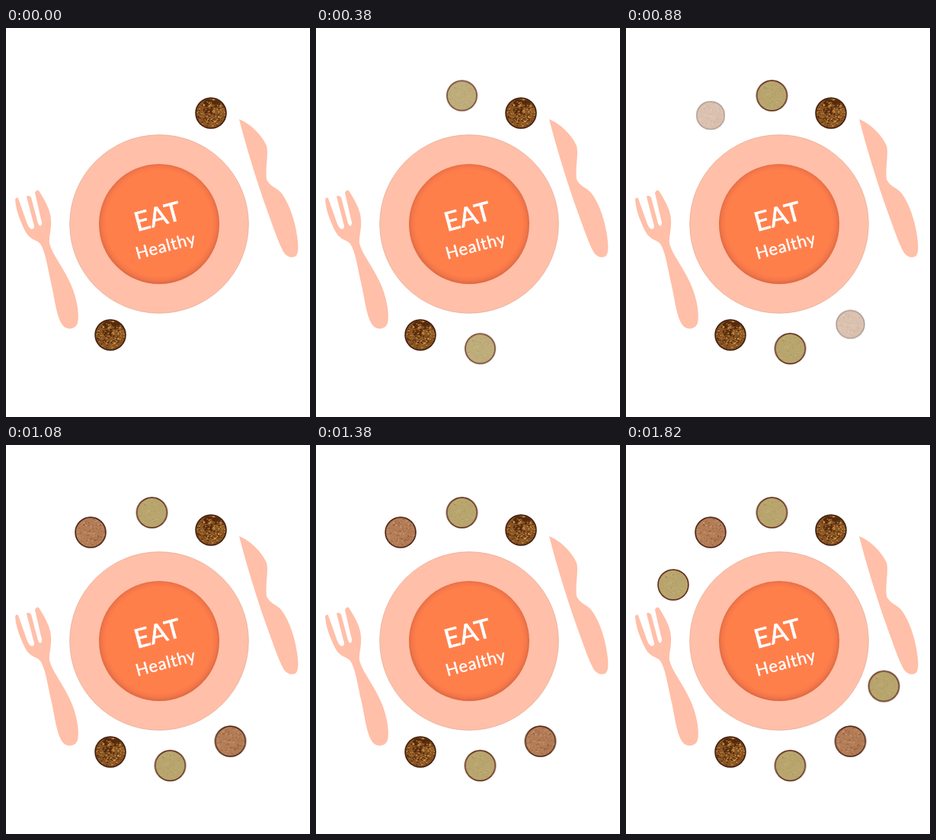
An HTML page that plays this animation: 399 by 512 pixels, repeating every 2700 ms.

```html
<!DOCTYPE html>
<html lang="en">
<head>
<meta charset="utf-8">
<title>Eat Healthy</title>
<style>
  html, body { margin: 0; width: 100%; height: 100%; overflow: hidden; background: #fff; }
  svg { display: block; width: 100vw; height: 100vh; }
  text {
    font-family: Lato, "Open Sans", sans-serif;
    fill: #fff; stroke: #fff; stroke-width: .7; stroke-linejoin: round;
  }
</style>
</head>
<body>
<svg viewBox="0 0 399 512">
  <defs>
    <radialGradient id="dish" gradientUnits="userSpaceOnUse" cx="201" cy="257" r="80">
      <stop offset=".87" stop-color="#ff7f4b"/>
      <stop offset=".94" stop-color="#f4774a"/>
      <stop offset="1" stop-color="#dc6840"/>
    </radialGradient>
    <clipPath id="inside"><circle r="18.8"/></clipPath>
  </defs>

  <g fill="#ffbfa8">
    <circle cx="201" cy="258" r="117.4" stroke="#d99a84" stroke-width=".5"/>
    <path d="M12 226Q13 222 16 224L28 258Q32 267 36 264Q38 262 36 257L27 222Q29 219 33 223L42 257Q44 262 46 260Q48 257 46 252L38 217Q40 212 43 214C50 225 59 240 59 253C60 265 56 275 57 283C60 297 74 313 84 335C92 352 97 375 94 388C92 396 82 398 76 393C66 383 64 355 59 335C54 313 52 295 45 284C40 278 32 280 25 267C19 255 13 240 12 226Z"/>
    <path d="M306 120C323 127 337 143 342 155C345 166 340 183 342 199C346 209 356 210 362 218C374 234 381 261 383 281C384 293 383 299 379 301C374 303 369 301 365 296C358 284 350 260 342 238C329 201 316 159 306 120Z"/>
  </g>
  <circle cx="201" cy="258" r="79" fill="url(#dish)"/>
  <text transform="translate(172 268) rotate(-15)" font-size="35">EAT</text>
  <text transform="translate(172.5 304.5) rotate(-15)" font-size="22" letter-spacing=".8" style="stroke-width:.4">Healthy</text>
  <g id="bowls"></g>
</svg>

<script>
const LOOP = 2700, GROW = 160;

// start: null means present from the beginning of the loop
const courses = [
  { start: null, at: [[269, 112], [137, 404]], food: "clusters" },
  { start: 260, at: [[191.5, 89], [215.5, 422]], food: "grain" },
  { start: 830, at: [[111, 115], [294.5, 390]], food: "flakes" },
  { start: 1400, at: [[62, 184], [338.5, 317.5]], food: "grain" }
];

const foods = {
  clusters: { base: "#895523", rim: "#43200f", tones: ["#4a220a", "#653411", "#b57a35", "#d09a50"], count: 190, size: 1.5, patches: true },
  grain: { base: "#b9a66f", rim: "#64301f", tones: ["#a99560", "#c9b980", "#9d8955"], count: 170, size: .8 },
  flakes: { base: "#b27c56", rim: "#51291a", tones: ["#8c5639", "#d09c77", "#9d6847", "#c88e67"], count: 180, size: 1.2 }
};

function node(name, attrs, parent) {
  const el = document.createElementNS("http://www.w3.org/2000/svg", name);
  for (const key in attrs) el.setAttribute(key, attrs[key]);
  return parent.appendChild(el);
}

function seeded(seed) {
  return () => (seed = seed * 16807 % 2147483647) / 2147483647;
}

function drawBowl(parent, food) {
  const rand = seeded(4127);
  node("circle", { r: 19.9, fill: food.base, stroke: food.rim, "stroke-width": 1.7 }, parent);
  const filling = node("g", { "clip-path": "url(#inside)" }, parent);
  const speck = (size, fill) => {
    const angle = rand() * Math.PI * 2, dist = Math.sqrt(rand()) * 19;
    node("ellipse", {
      cx: (Math.cos(angle) * dist).toFixed(1),
      cy: (Math.sin(angle) * dist).toFixed(1),
      rx: size, ry: size * .7, fill
    }, filling);
  };
  if (food.patches) for (let i = 0; i < 13; i++) speck(2.5 + rand() * 2, "#552a0d");
  for (let i = 0; i < food.count; i++) {
    speck(food.size * (.45 + rand() * .55), food.tones[i % food.tones.length]);
  }
}

function appear(el, start) {
  const hidden = { opacity: 0, transform: "scale(.85)" };
  const shown = { opacity: 1, transform: "scale(1)" };
  el.animate([
    { ...hidden, offset: 0 },
    { ...hidden, offset: start / LOOP, easing: "ease-out" },
    { ...shown, offset: (start + GROW) / LOOP },
    { ...shown, offset: 1 }
  ], { duration: LOOP, iterations: Infinity });
}

const table = document.getElementById("bowls");
for (const { start, at, food } of courses) {
  for (const [x, y] of at) {
    const place = node("g", { transform: `translate(${x} ${y})` }, table);
    const bowl = node("g", {}, place);
    drawBowl(bowl, foods[food]);
    if (start !== null) appear(bowl, start);
  }
}
</script>
</body>
</html>
```
